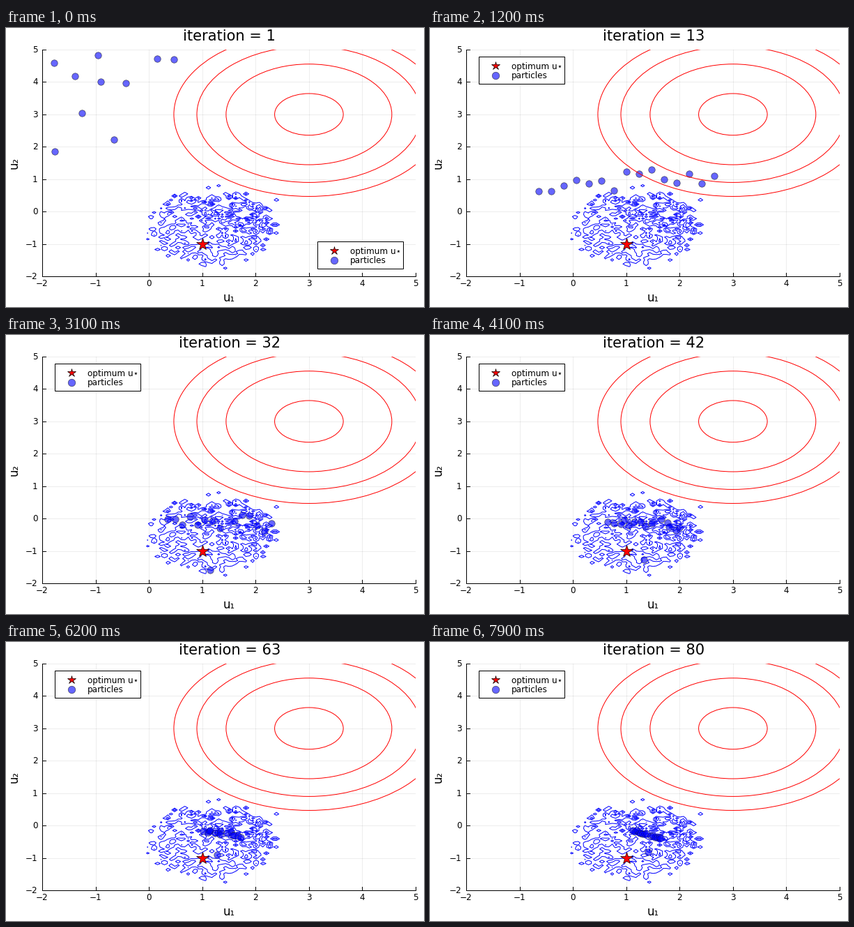
These frames come from a looping animation (600 by 400 pixels, 8 s). A matplotlib script:

```python
import numpy as np
import matplotlib.pyplot as plt
from matplotlib.animation import FuncAnimation
from matplotlib.patches import Circle, Rectangle

W, H, FRAMES = 600, 400, 80
PX = 0.72  # points per pixel at 100 dpi
LEGEND_MOVE = 6
LEFT, BOTTOM, WIDTH, HEIGHT = 52, 44, 536, 325

plt.rcParams["font.family"] = "DejaVu Sans"
fig = plt.figure(figsize=(W / 100, H / 100), dpi=100, facecolor="white")
ax = fig.add_axes([LEFT / W, BOTTOM / H, WIDTH / W, HEIGHT / H])
ax.set(xlim=(-2, 5), ylim=(-2, 5), xticks=[], yticks=[])
for side in ("top", "right"):
    ax.spines[side].set_visible(False)
for side in ("left", "bottom"):
    ax.spines[side].set_linewidth(PX)

# Overlay in pixel coordinates, y pointing down
top = fig.add_axes([0, 0, 1, 1])
top.set(xlim=(0, W), ylim=(H, 0))
top.axis("off")


def label(x, y, text, size, **kw):
    kw = {"va": "baseline"} | kw
    return top.text(x, y, text, fontsize=size * PX, **kw)


def draw_axes():
    base = H - BOTTOM
    for k in range(-2, 6):
        x = LEFT + (k + 2) * WIDTH / 7
        y = base - (k + 2) * HEIGHT / 7
        ax.axvline(k, color="black", alpha=0.1, lw=0.5, zorder=0)
        ax.axhline(k, color="black", alpha=0.1, lw=0.5, zorder=0)
        top.plot([x, x], [base, base - 5], "k", lw=PX)
        top.plot([LEFT, LEFT + 5], [y, y], "k", lw=PX)
        name = str(k).replace("-", "\u2212")
        label(x, 370.5, name, 12, ha="center")
        label(LEFT - 6.5, y + 4, name, 12, ha="right")
    label(320.5, 391.5, "u\u2081", 16.5, ha="center")
    label(16.5, 193, "u\u2082", 16.5, ha="center", va="center", rotation=90,
          rotation_mode="anchor").set_va("baseline")


def noisy_field(rng, n=111):
    """Random dips, dense in a round patch and deeper to the upper right."""
    g = np.linspace(-2, 5, n)
    x, y = np.meshgrid(g, g)
    r = np.hypot((x - 1.18) / 1.24, (y + 0.5) / 1.17)
    hollow = np.exp(-((x - 1.15) / 0.4) ** 2 - ((y + 0.78) / 0.2) ** 2)
    slope = np.clip(0.4 + 0.5 * (x - 1.1) + 0.8 * (y + 0.5), 0, 1)
    chance = 0.45 * (1 - 0.5 * hollow) / (1 + np.exp((r - 0.94) / 0.045))
    depth = rng.uniform(0.2, 1, x.shape) * (0.8 + 0.8 * slope)
    z = rng.uniform(0.3, 0.6, x.shape)
    return g, z - depth * (rng.random(x.shape) < chance)


def particle_paths(rng):
    """Jittery drift through a few stations towards a consensus line."""
    seen = [(-1.78, 4.59), (-1.76, 1.86), (-1.39, 4.18), (-1.26, 3.03),
            (-.95, 4.82), (-.9, 4.02), (-.66, 2.22), (-.43, 3.97),
            (.15, 4.72), (.47, 4.69)]
    unseen = [(x, 5.7) for x in np.linspace(0.9, 1.7, 5)]
    start = np.array(seen + unseen)
    n = len(start)

    def row(x0, x1, y0, y1, spread):
        ys = np.linspace(y0, y1, n) + rng.normal(0, spread, n)
        return np.column_stack([np.linspace(x0, x1, n), ys])

    near = row(-0.64, 2.65, 0.7, 1.1, 0.2)
    inside = row(0.35, 2.3, 0, -0.15, 0.12)
    end = row(1.12, 1.65, -0.16, -0.4, 0.02)
    straggler = 8
    inside[straggler], end[straggler] = (1.15, -1.6), (1.41, -0.82)

    stations = [start, near, inside, end]
    times = [0, 12, 31, FRAMES - 1]
    paths = np.empty((FRAMES, n, 2))
    for i, jitter in enumerate((0.1, 0.07, 0.012)):
        a, b = times[i], times[i + 1]
        t = np.arange(b - a + 1)[:, None, None]
        ease = (1 - np.exp(-0.05 * t)) / (1 - np.exp(-0.05 * (b - a)))
        walk = np.cumsum(rng.normal(0, jitter, (len(t), n, 2)), axis=0)
        walk -= walk[0]
        bridge = walk - walk[-1] * t / (b - a)
        paths[a:b + 1] = stations[i] + (stations[i + 1] - stations[i]) * ease + bridge
    return paths


rng = np.random.default_rng(7)
draw_axes()
for k in range(4):
    ax.add_patch(Circle((3, 3), np.sqrt(0.414 + 2 * k), fill=False,
                        ec="red", lw=PX, zorder=3))
grid, field = noisy_field(rng)
ax.contour(grid, grid, field, levels=[-0.95, -0.35, 0.25], colors="blue",
           linewidths=PX, linestyles="solid", zorder=3)

paths = particle_paths(rng)
DOT = dict(marker="o", ls="none", mfc=(0, 0, 1, 0.6), mec=(0, 0, 0, 0.6), mew=0.5)
STAR = dict(marker="*", ls="none", mfc="red", mec="black", mew=0.5)
dots = [ax.plot([], [], ms=9.5 * PX, zorder=2, **DOT)[0] for _ in paths[0]]
ax.plot(1, -1, ms=18.5 * PX, zorder=5, **STAR)

title = label(321, 18, "", 21, ha="center")
box = top.add_patch(Rectangle((0, 0), 123, 39, fc="white", ec="black", lw=PX))
star_key, = top.plot([], [], ms=12 * PX, zorder=4, **STAR)
dot_key, = top.plot([], [], ms=10.5 * PX, zorder=4, **DOT)
star_text = label(0, 0, "optimum u\u22c6", 12, zorder=4)
dot_text = label(0, 0, "particles", 12, zorder=4)


def place_legend(x, y):
    box.set_xy((x, y))
    star_key.set_data([x + 24], [y + 13])
    dot_key.set_data([x + 24], [y + 26.5])
    star_text.set_position((x + 47, y + 18))
    dot_text.set_position((x + 47, y + 31))


def update(i):
    title.set_text(f"iteration = {i + 1}")
    place_legend(*((447, 306) if i < LEGEND_MOVE else (70, 41)))
    for dot, (u, v) in zip(dots, paths[i]):
        dot.set_data([u], [v])
    return dots


anim = FuncAnimation(fig, update, frames=FRAMES, interval=100,
                     repeat=True, repeat_delay=0)
plt.show()
```
